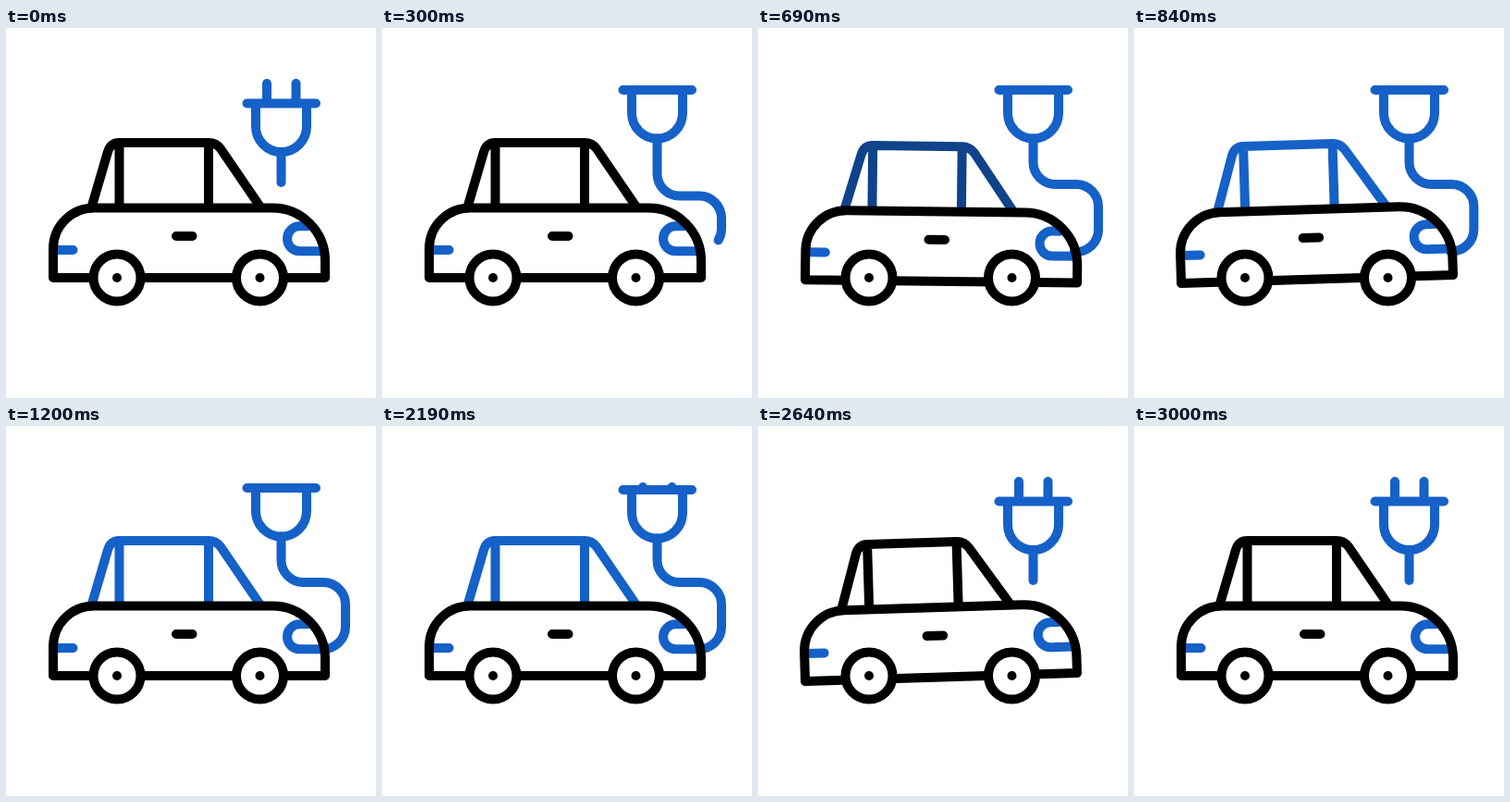
An HTML page with a canvas for the animation above (3.09 s loop, 400 by 400 pixels).

```html
<!DOCTYPE html>
<html lang="en">
<head>
<meta charset="utf-8">
<title>Electric car charging</title>
<style>
  html, body { margin: 0; width: 100%; height: 100%; overflow: hidden; background: #fff; }
  canvas { display: block; width: 400px; height: 400px; }
</style>
</head>
<body>
<canvas id="stage"></canvas>
<script>
const LOOP = 3090, TICK = 30, LEAVE = 2190, CONTACT = 390;
const BLACK = '#000', BLUE = '#1561c8', BLUE_RGB = [21, 97, 200];
const canvas = document.getElementById('stage');
const ctx = canvas.getContext('2d');
const ratio = window.devicePixelRatio || 1;
canvas.width = canvas.height = 400 * ratio;

const inOut = x => (1 - Math.cos(Math.PI * x)) / 2;
const outBack = x => 1 + 3.4 * (x - 1) ** 3 + 2.4 * (x - 1) ** 2;

// Eased rise from 0 to 1
function ramp(t, start, duration, ease = inOut) {
  return ease(Math.min(1, Math.max(0, (t - start) / duration)));
}

// The front dips, the rear answers, then the body settles
const tiltAt = t => 1.75 * (ramp(t, 0, 210) - 2 * ramp(t, 210, 240) + ramp(t, 450, 360));
const dropAt = t => 5 * (ramp(t, 0, 150) - ramp(t, 150, 480));

function stroke(d, color) {
  ctx.strokeStyle = color;
  ctx.stroke(new Path2D(d));
}

function drawCable(top, elbow, reach, sway) {
  const stub = 33, right = 367 + sway, bottom = 241 + sway;
  const length = 145 - top + 36 * Math.PI + 46.5 + 3 * sway;
  ctx.setLineDash([stub + (length - stub) * reach, 1000]);
  stroke(`M297.5 ${top} V${145 + elbow} a24 24 0 0 0 24 24 H${right - 24}
    a24 24 0 0 1 24 24 V${bottom - 24} a24 24 0 0 1 -24 24 H342`, BLUE);
  ctx.setLineDash([]);
}

function drawPlug(p) {
  const y = 67 + 14.5 * p, tip = 67 - 7 * p;
  stroke(`M282 ${tip} V${y} M313.5 ${tip} V${y} M260.5 ${y} H335
    M270 ${y} v25 a27.5 27.5 0 0 0 55 0 v-25`, BLUE);
}

function drawCar(tilt, drop, tint) {
  ctx.save();
  ctx.translate(198, 270 + drop);
  ctx.rotate(tilt * Math.PI / 180);
  ctx.translate(-198, -270);
  stroke(`M93 192 L110 134 Q113 124 122.5 124 H219 Q227 124 232 130.5 L274 192
    M122.5 124 V193 M219 124 V193`, `rgb(${BLUE_RGB.map(c => Math.round(c * tint))})`);
  stroke('M326 214.3 H317.5 a13.5 13.5 0 0 0 0 27 H341 M53 240 H72.5', BLUE);
  stroke('M51 270 V238 A44 44 0 0 1 95 194.5 H288 A57 57 0 0 1 345 251 V270 Z M184 225 H201.5', BLACK);
  ctx.restore();
}

function drawWheel(x) {
  const disc = r => {
    ctx.beginPath();
    ctx.arc(x, 270, r, 0, 2 * Math.PI);
  };
  disc(25.5);
  ctx.fillStyle = '#fff';
  ctx.fill();
  ctx.strokeStyle = BLACK;
  ctx.stroke();
  disc(5);
  ctx.fillStyle = BLACK;
  ctx.fill();
}

function draw(t) {
  ctx.setTransform(ratio, 0, 0, ratio, 0, 0);
  ctx.fillStyle = '#fff';
  ctx.fillRect(0, 0, 400, 400);
  ctx.lineWidth = 10;
  ctx.lineCap = ctx.lineJoin = 'round';

  const unplug = 1 - ramp(t, 0, 300) + ramp(t, LEAVE - 10, 375, outBack);
  const slack = 1 - ramp(t, 0, 660) + ramp(t, LEAVE, 330);
  const reach = ramp(t, 60, 330) - ramp(t, LEAVE, 300);
  const tint = ramp(t, CONTACT + 150, 240) - ramp(t, LEAVE + 150, 240);
  const bounce = t < LEAVE ? t - CONTACT : t - LEAVE;
  const drop = dropAt(bounce);

  const elbow = 22 * slack + 14.5 * Math.max(0, unplug - 1);
  drawCable(119.5 + 14.5 * unplug, elbow, reach, drop / 4);
  drawPlug(unplug);
  drawCar(tiltAt(bounce), drop, tint);
  drawWheel(120);
  drawWheel(274.5);
}

const start = performance.now();
function play() {
  const t = (performance.now() - start) % LOOP;
  draw(Math.floor(t / TICK) * TICK);
  requestAnimationFrame(play);
}
play();
</script>
</body>
</html>
```
